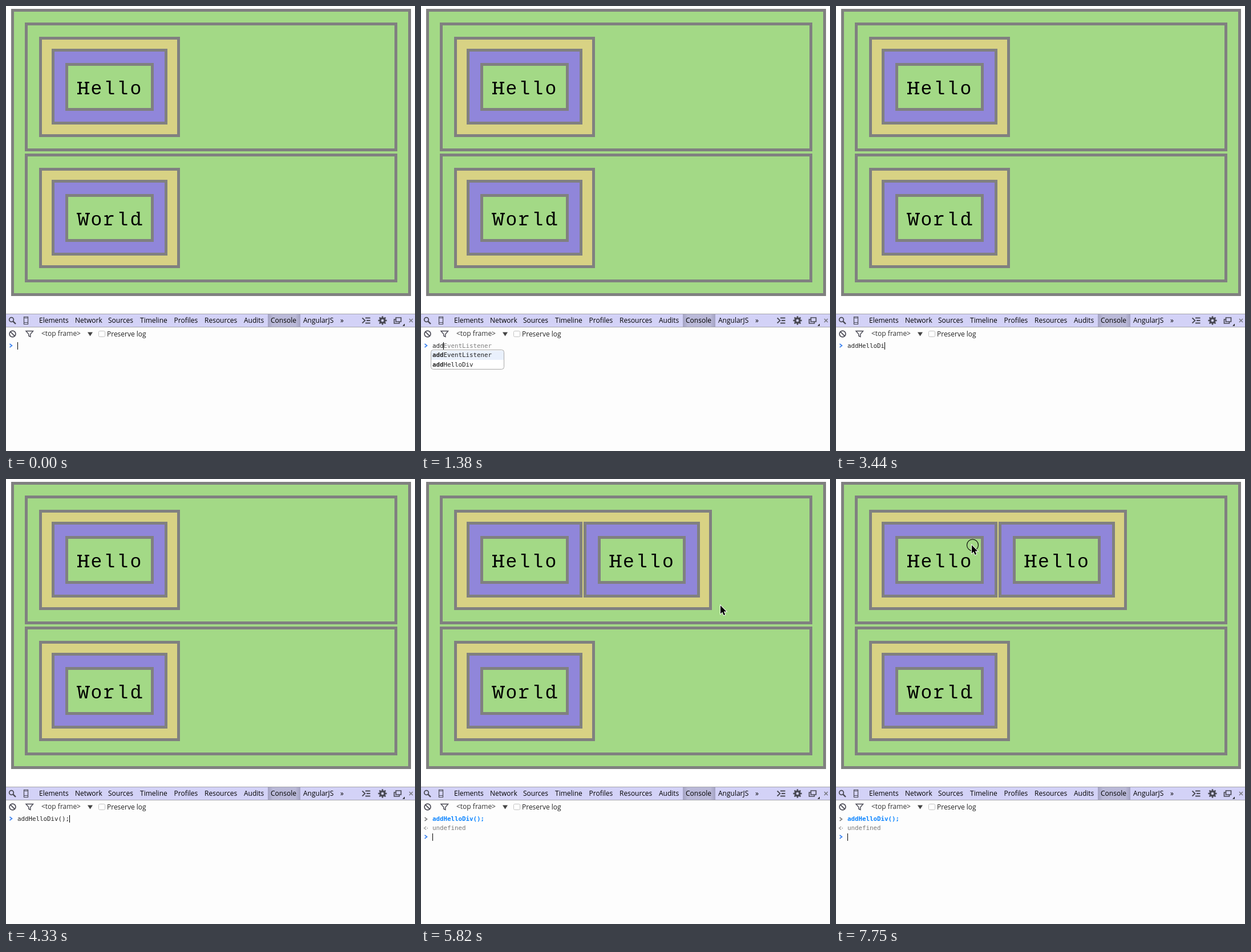
An HTML page with a canvas that plays this animation: 717 px wide and 781 px high, repeating every 8 s.

```html
<!DOCTYPE html>
<html>
<head>
<meta charset="utf-8">
<style>
html, body { margin: 0; width: 717px; height: 781px; overflow: hidden; background: #fff; }
canvas { display: block; }
</style>
</head>
<body>
<canvas id="stage" width="717" height="781"></canvas>
<script>
const ctx = document.getElementById('stage').getContext('2d');
const GREEN = '#a3d986', TAN = '#d8d284', PURPLE = '#9086da', GRAY = '#808080', ICON = '#4a4a55';
const UI = '12px "Open Sans", "Noto Sans", sans-serif';
const CODE = '10.8px "DejaVu Sans Mono", monospace';
const CHAR = 6.5, LOOP = 8000;
const WORDS = ['addEventListener', 'addHelloDiv', 'alert', 'applicationCache', 'atob'];

// Time, prompt text ("|" is the caret, the rest is a suggestion), popup open
const typing = [
  [0, '|'], [450, ''], [630, 'a|'],
  [930, 'a|ddEventListener', true], [1080, 'ad|dEventListener', true], [1380, 'add|EventListener', true],
  [1970, 'addH|'], [2270, 'addHe|'], [2410, 'addHel|'], [2560, 'addHell|'], [2710, 'addHello|'],
  [2850, 'addHello|Div'], [3150, 'addHelloD|'], [3300, 'addHelloD|iv'], [3440, 'addHelloDi|'],
  [3590, 'addHelloDiv|'], [3880, 'addHelloDiv(|'], [4030, 'addHelloDiv()|'], [4330, 'addHelloDiv();|'],
  [4630, '|'], [5230, ''], [5820, '|'], [6410, ''], [6560, '|'], [7160, ''], [7750, '|']
];
const pointer = [
  [5670, 648, 208], [5820, 525, 222], [5970, 405, 212], [6120, 312, 184], [6260, 256, 155],
  [6410, 235, 136], [6560, 232, 114], [6710, 231, 116], [6860, 238, 116]
];
const RUN = 4630, CLICK = 7600;

const at = (list, t) => list.filter(step => step[0] <= t).pop();

function rect(x, y, w, h, color) {
  ctx.fillStyle = color;
  ctx.fillRect(x, y, w, h);
}

function text(s, x, y, font, color) {
  ctx.font = font;
  ctx.fillStyle = color;
  ctx.fillText(s, x, y);
}

function path(d, color, width) {
  const p = new Path2D(d);
  if (width) {
    ctx.strokeStyle = color;
    ctx.lineWidth = width;
    ctx.stroke(p);
  } else {
    ctx.fillStyle = color;
    ctx.fill(p);
  }
}

function circle(x, y, r, color, width) {
  ctx.beginPath();
  ctx.arc(x, y, r, 0, 7);
  ctx.strokeStyle = color;
  ctx.lineWidth = width;
  ctx.stroke();
}

function box(left, top, right, bottom, color) {
  const [x, y, r, b] = [left, top, right, bottom].map(Math.round);
  rect(x, y, r - x, b - y, GRAY);
  rect(x + 5, y + 5, r - x - 10, b - y - 10, color);
}

// Slab ends per letter: offset from the letter's middle, height over the baseline, width
const SLABS = {
  H: [[-10.5, 22, 8], [2.5, 22, 8], [-10.5, 2.4, 8], [2.5, 2.4, 8]],
  W: [[-11.5, 22, 8], [3.5, 22, 8]],
  r: [[-9, 17.4, 5], [-9, 2.4, 13]],
  d: [[1.5, 24, 5], [6, 2.4, 5]]
};

function word(s, x, y) {
  ctx.textAlign = 'center';
  [...s].forEach((c, i) => {
    const mid = x + 23 * i + 11.5;
    text(c, mid, y, '33px "Liberation Mono", monospace', '#000');
    for (const [dx, up, w] of SLABS[c] || []) rect(mid + dx, y - up, w, 2.4, '#000');
  });
  ctx.textAlign = 'left';
}

function cell(s, dx, y) {
  box(79.6 + dx, y + 46, 283.3 + dx, y + 179, PURPLE);
  box(104.3 + dx, y + 71, 258.7 + dx, y + 155, GREEN);
  word(s, 124 + dx, y + 126);
}

function row(s, count, y) {
  box(33, y, 686, y + 226, GREEN);
  box(58, y + 25, count > 1 ? 510 : 305, y + 201, TAN);
  for (let i = 0; i < count; i++) cell(s, 205.5 * i, y);
}

function toolbar() {
  rect(0, 540, 717, 24, '#a6a6ac');
  rect(0, 541, 717, 22, '#d3d2f7');
  const shade = ctx.createLinearGradient(459, 0, 516, 0);
  [[0, '#a3a2c2'], [.15, '#bab9d8'], [.85, '#bab9d8'], [1, '#a3a2c2']].forEach(s => shade.addColorStop(...s));
  rect(459, 541, 57, 22, shade);
  const tabs = { Elements: 58, Network: 121, Sources: 179, Timeline: 235, Profiles: 294.5, Resources: 348,
    Audits: 417, Console: 464, AngularJS: 521, '»': 586 };
  for (const name in tabs) text(name, tabs[name], 556, UI, '#000');

  circle(9.5, 550.5, 3.8, ICON, 1.8);
  path('M12.3 553.3L17 558', ICON, 2.4);
  path('M31.5 545.5h7v13h-7zM31 555.5h8M31 547.5h8', ICON, 1.2);
  path('M624.5 547.5l5 4.5l-5 4.5M630 547.5h8.5M632 552h6.5M630 556.5h8.5', ICON, 1.8);
  circle(660, 552, 4, ICON, 3.4);
  for (let i = 0; i < 8; i++) {
    const c = Math.cos(i * Math.PI / 4), s = Math.sin(i * Math.PI / 4);
    path(`M${660 + 5 * c} ${552 + 5 * s}L${660 + 7.6 * c} ${552 + 7.6 * s}`, ICON, 2.6);
  }
  path('M683.5 547h9v7h-9zM683 550h-2.5v7h9v-2.5', ICON, 1.7);
  path('M699 557.5v4h-4z', '#222');
  path('M707 549l6 6m0-6l-6 6', '#77777f', 1.6);
}

function filterBar() {
  rect(0, 564, 717, 217, '#fdfdfd');
  circle(11.5, 575.5, 5.4, ICON, 1.7);
  path('M7.7 571.7l7.6 7.6', ICON, 1.7);
  path('M35 570.5h12.5l-4.7 5.5v4.5l-3 -1.5v-3z', ICON, 1.4);
  text('<top frame>', 62, 579, UI, '#333');
  path('M143 572.5h9l-4.5 7z', '#444');
  ctx.beginPath();
  ctx.roundRect(162.5, 570.5, 11, 10, 2);
  ctx.fillStyle = '#fff';
  ctx.fill();
  ctx.strokeStyle = '#c2c2c2';
  ctx.lineWidth = 1;
  ctx.stroke();
  text('Preserve log', 177, 580, UI, '#222');
}

const chevron = (y, color) => path(`M6.5 ${y - 3}l4 3l-4 3`, color, 1.6);

function popup(typed) {
  const items = WORDS.filter(w => w.startsWith(typed));
  const height = 16.5 * items.length + 2;
  ctx.beginPath();
  ctx.roundRect(17.5, 603.5, 128, Math.round(height) - 1, 4);
  ctx.fillStyle = '#fff';
  ctx.fill();
  rect(18, 605, 127, 16, '#e9f0fc');
  ctx.strokeStyle = '#a8a8a8';
  ctx.lineWidth = 1;
  ctx.stroke();
  items.forEach((item, i) => {
    const y = 616 + 16.5 * i;
    text(typed, 20, y, 'bold ' + CODE, '#222');
    text(item.slice(typed.length), 20 + CHAR * typed.length, y, CODE, '#222');
  });
}

function prompt(t, y) {
  const [, line, open] = at(typing, t);
  const [typed, hint = ''] = line.split('|');
  const end = 20 + CHAR * typed.length;
  chevron(y, '#3b82f0');
  text(typed, 20, y + 4, CODE, '#222');
  text(hint, end, y + 4, CODE, '#808080');
  if (line.includes('|')) rect(Math.floor(end), y - 6, 1, 13, '#000');
  if (open) popup(typed);
}

function mouse(t) {
  const spot = at(pointer, t);
  if (!spot) return;
  if (t >= CLICK) circle(239.5, 116, 10, '#000', 1.1);
  ctx.save();
  ctx.translate(spot[1], spot[2]);
  const arrow = 'M0 0V14.5L3.3 11.4L5.8 17L8.2 16L5.8 10.6H10.3Z';
  path(arrow, '#fff', 1.8);
  path(arrow, '#000');
  ctx.restore();
}

function draw() {
  const t = performance.now() % LOOP, done = t >= RUN;
  rect(0, 0, 717, 781, '#fff');
  box(9, 5, 710, 509, GREEN);
  row('Hello', done ? 2 : 1, 29);
  row('World', 1, 259);
  toolbar();
  filterBar();
  if (done) {
    chevron(597, '#808080');
    text('addHelloDiv();', 20, 600, 'bold ' + CODE, '#0b84ff');
    path('M9 610l-3.5 2.8l3.5 2.8', '#999', 1.3);
    rect(10.5, 612, 1.5, 1.5, '#999');
    text('undefined', 20, 616, CODE, '#777');
  }
  prompt(t, done ? 628 : 596);
  mouse(t);
  requestAnimationFrame(draw);
}
draw();
</script>
</body>
</html>
```
